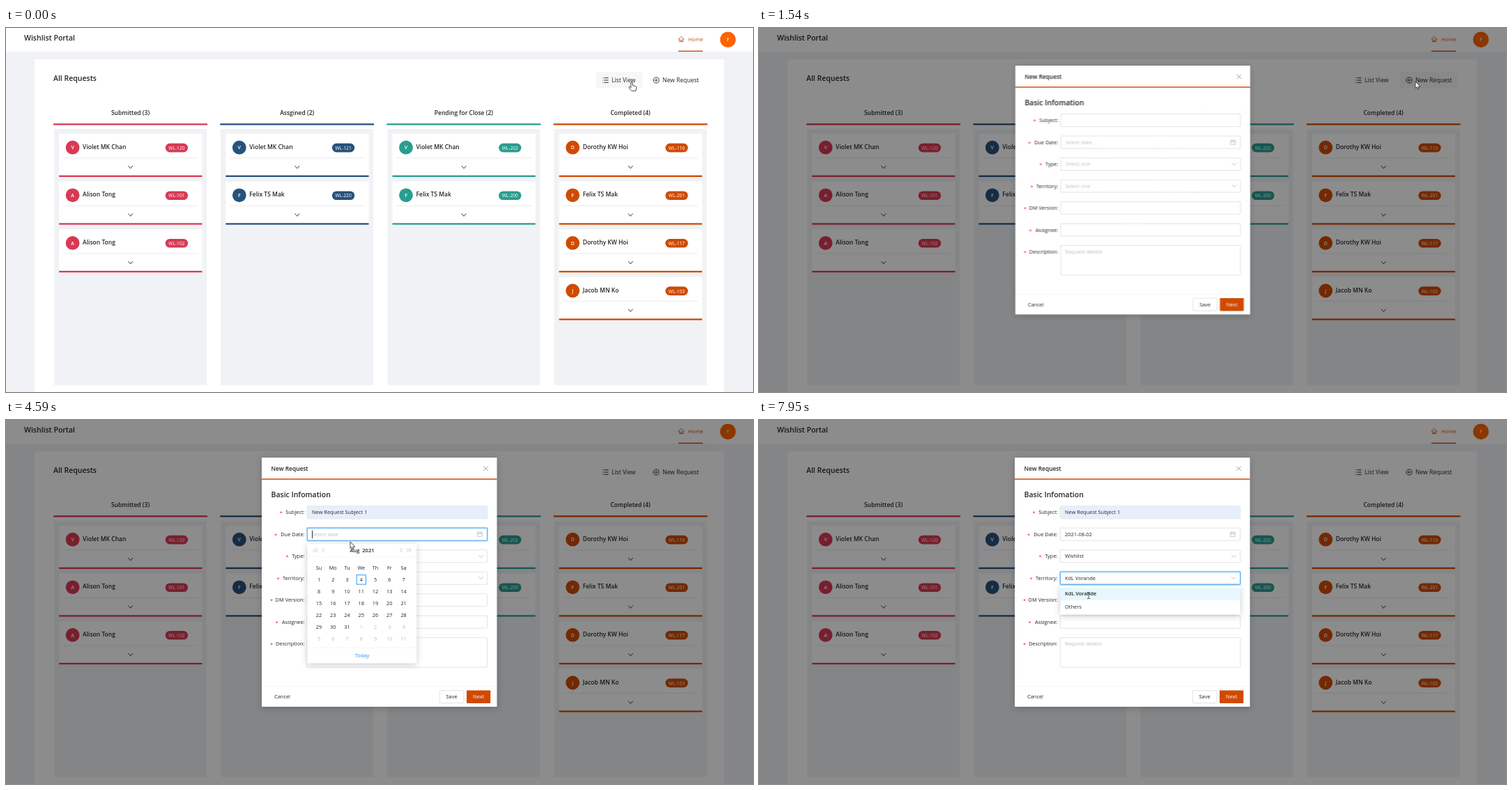
An HTML page for the animation above (8 s loop, 1072 px wide and 523 px high).

```html
<!DOCTYPE html>
<html lang="en">
<head>
<meta charset="utf-8">
<title>Wishlist Portal</title>
<style>
  html, body { margin: 0; width: 100%; height: 100%; overflow: hidden; background: #f0f2f5; }
  svg { display: block; width: 100vw; height: 100vh; font-family: "Open Sans", "Noto Sans", sans-serif; }
  text { fill: #262626; white-space: pre; }
  .semi { font-weight: 600; }
  .mid { text-anchor: middle; }
  .end { text-anchor: end; }
  .hint { fill: #bfbfbf; }
  .white { fill: #fff; }
  .accent { fill: #d04a02; }
  .line { fill: none; stroke-linecap: round; stroke-linejoin: round; }
  .shadow { filter: drop-shadow(0 2px 5px rgba(0, 0, 0, .2)); }
</style>
</head>
<body>
<svg id="stage" viewBox="0 0 1072 523" preserveAspectRatio="none"></svg>
<script>
const LOOP = 8000;
const ORANGE = '#d04a02', BLUE = '#1890ff';

// Markup helpers; text is placed by the middle of its capitals
const text = (x, y, s, size = 7.45, cls = '', more = '') =>
  `<text x="${x}" y="${(y + size * .36).toFixed(2)}" font-size="${size}" class="${cls}" ${more}>${s}</text>`;
const rect = (x, y, w, h, fill, more = '') =>
  `<rect x="${x}" y="${y}" width="${w}" height="${h}" fill="${fill}" ${more}/>`;
const disc = (x, y, r, fill) => `<circle cx="${x}" cy="${y}" r="${r}" fill="${fill}"/>`;
const line = (x, y, d, color, width = 1) =>
  `<path class="line" transform="translate(${x} ${y})" d="${d}" stroke="${color}" stroke-width="${width}"/>`;
const chevron = (x, y, color = '#333', w = 1) => line(x, y, 'M-3-1.7 0 1.8 3-1.7', color, w);
const group = (id, body, more = '') => `<g id="${id}" ${more}>${body}</g>`;

// Timeline helpers, all in milliseconds
let css = '';
function track(id, keys, ease = 'linear') {
  const body = keys.map(([ms, style, curve]) =>
    `${ms * 100 / LOOP}%{${style}${curve ? `;animation-timing-function:${curve}` : ''}}`).join('');
  css += `@keyframes ${id}{${body}}#${id}{animation:${id} ${LOOP}ms ${ease} infinite}\n`;
}
function show(id, ...spans) {
  track(id, [[0, 'opacity:0'], ...spans.flatMap(([a, b = LOOP]) =>
    [[a, 'opacity:1'], [b, 'opacity:0']])], 'step-end');
}
function slide(id, top, open, opened, close, closed) {
  const off = 'opacity:0;transform:scaleY(.8)', on = 'opacity:1;transform:none';
  const keys = [[0, off], [open, off, 'cubic-bezier(.23,1,.32,1)'], [opened, on]];
  if (close) keys.push([close, on, 'cubic-bezier(.755,.05,.855,.06)'], [closed, off], [LOOP, off]);
  else keys.push([LOOP, on]);
  track(id, keys);
  css += `#${id}{transform-origin:0 ${top}px}\n`;
}

// Board
const V = 'Violet MK Chan', A = 'Alison Tong', F = 'Felix TS Mak', D = 'Dorothy KW Hoi', J = 'Jacob MN Ko';
const columns = [
  ['Submitted', '#d93954', [[V, 120], [A, 101], [A, 102]]],
  ['Assgined', '#26527c', [[V, 121], [F, 220]]],
  ['Pending for Close', '#2a9d8f', [[V, 202], [F, 200]]],
  ['Completed', ORANGE, [[D, 116], [F, 201], [D, 117], [J, 103]]],
];

const card = (x, y, color, [name, no]) =>
  rect(x + 8, y, 205.3, 62, '#fff') +
  rect(x + 8, y + 59.7, 205.3, 2.3, color) +
  disc(x + 27.5, y + 19.7, 9.9, color) +
  text(x + 27.5, y + 19.9, name[0], 7, 'semi white mid') +
  text(x + 42, y + 18.8, name, 8.5, 'semi') +
  rect(x + 160.6, y + 13.8, 32.4, 12.6, color, 'rx="6.3"') +
  text(x + 176.8, y + 20.3, 'WL-' + no, 6.7, 'white mid') +
  rect(x + 13.8, y + 34.4, 193.5, .8, '#e6e6e6') +
  chevron(x + 110.6, y + 48);

const column = ([title, color, cards], i) => {
  const x = 68.1 + 239.2 * i;
  return text(x + 110.4, 121.8, `${title} (${cards.length})`, 8.5, 'semi mid') +
    rect(x, 137.2, 220.9, 2.3, color) +
    rect(x + .9, 145.2, 219, 368, '#f0f2f5') +
    cards.map((c, k) => card(x, 152 + 68.6 * k, color, c)).join('');
};

const page =
  rect(0, 0, 1072, 523, '#f0f2f5') + rect(0, 0, 1072, 34, '#fff') +
  rect(41, 45, 989.5, 478, '#fff') +
  text(26, 13.8, 'Wishlist Portal', 10.5, 'semi') +
  line(969, 16.2, 'M-4 0 0-3.8 4 0M-2.8-1V3.4H2.8V-1M-.9 3.4V1H.9V3.4', ORANGE, .8) +
  text(979, 16, 'Home', 7.6, 'accent') +
  rect(965, 32.6, 35, 1.4, ORANGE) +
  disc(1036, 16.7, 11.2, '#fa6400') + text(1036, 16.9, 'F', 7, 'white mid') +
  text(68, 72.2, 'All Requests', 10.5, 'semi') +
  group('hoverList', rect(846.5, 63, 66.5, 23, '#f7f7f7')) +
  group('hoverNew', rect(920, 63, 82.5, 23, '#f7f7f7')) +
  line(856, 75, 'M.3-3.3H.4M.3 0H.4M.3 3.3H.4M2.6-3.3H8.2M2.6 0H8.2M2.6 3.3H8.2', '#333', 1) +
  text(869, 75.2, 'List View', 8.55) +
  line(933, 75, 'M-4.1 0A4.1 4.1 0 1 1 4.1 0A4.1 4.1 0 1 1-4.1 0M-2 0H2M0-2V2', '#333', .9) +
  text(942, 75.2, 'New Request', 8.55) +
  columns.map(column).join('');

// Form
const LEFT = 432.3, WIDE = 258.3, TX = 439;
const rowY = i => 132.7 + 31.5 * i;
const label = (s, i) => {
  const w = [34, 41.5, 25, 38, 47.5, 40, 47.5][i];
  return text(428.6, rowY(i), s + ':', 7.45, 'end') +
    text(428.6 - w, rowY(i) + 1, '*', 7.45, 'mid', 'style="fill:#f5222d"');
};
const box = (i, h = 18) => rect(LEFT, rowY(i) - 9, WIDE, h, '#fff', 'stroke="#d9d9d9" stroke-width=".7" rx=".8"');
const focus = (id, i) => group(id,
  rect(LEFT - 1, rowY(i) - 10, WIDE + 2, 20, 'none', `stroke="${BLUE}" stroke-opacity=".2" stroke-width="1.4" rx="1.5"`) +
  rect(LEFT, rowY(i) - 9, WIDE, 18, 'none', 'stroke="#40a9ff" rx=".8"'));
const value = (id, i, s, cls = '') => group(id, text(TX, rowY(i), s, 7.45, cls));
const caret = (id, x, i) => group(id, rect(x, rowY(i) - 5.6, .9, 11.5, '#222'));

const fields =
  ['Subject', 'Due Date', 'Type', 'Territory', 'DM Version', 'Assignee', 'Description'].map(label).join('') +
  [0, 1, 2, 3, 4, 5].map(i => box(i)).join('') + box(6, 42.5) +
  group('filled', rect(LEFT + .4, rowY(0) - 8.6, WIDE - .8, 17.2, '#e6effb')) +
  value('tryOne', 0, '1') + value('subject', 0, 'New Request Subject 1') +
  value('dateHint', 1, 'Select date', 'hint') +
  value('datePreview', 1, '2021-08-02', 'hint') + value('date', 1, '2021-08-02') +
  line(680, rowY(1), 'M-3.2-2.6H3.2V3.1H-3.2ZM-3.2-.6H3.2M-1.5-3.5V-1.9M1.5-3.5V-1.9', '#b5b5b5', .7) +
  value('typeHint', 2, 'Select one', 'hint') + value('type', 2, 'Wishlist') +
  value('areaHint', 3, 'Select one', 'hint') + value('area', 3, 'KdL Vorande') +
  chevron(681.5, rowY(2), '#bbb', .8) + chevron(681.5, rowY(3), '#bbb', .8) +
  text(TX, rowY(6), 'Request details', 7.45, 'hint') +
  focus('focusSubject', 0) + focus('focusDate', 1) + focus('focusType', 2) + focus('focusArea', 3) +
  caret('caretStart', 439, 0) + caret('caretEnd', 518.6, 0) + caret('caretDate', 439, 1);

const suggestions = ['1', 'New Request Subject 1', 'New Request Subject 2', 'New Request Subject 3',
  'New Request Subject 4', 'My new Subject 1 from LumvaDB Quill Cloud'];
const suggestRow = (id, i) => group(id, rect(432.7, 146.6 + 20.2 * i, 174.2, 20.2, '#525355'));
const suggest = group('suggest',
  rect(432.7, 142.8, 174.2, 129.6, '#3a3b3d', 'rx="1.5" class="shadow"') +
  suggestRow('overOne', 0) + suggestRow('overTwo', 1) +
  suggestions.map((s, i) => text(TX, 156.8 + 20.2 * i, s, 7.45, '', 'style="fill:#f1f1f1"')).join(''));

const cellX = i => 449 + 20.27 * (i % 7), cellY = i => 229.4 + 16.9 * Math.floor(i / 7);
const cell = (i, fill, more = '') => rect(cellX(i) - 6.7, cellY(i) - 6.7, 13.4, 13.4, fill, more);
const arrow = (x, dir) => line(x, 187.3, `M${1.3 * dir}-2.6 ${-1.3 * dir} 0 ${1.3 * dir} 2.6`, '#b5b5b5', .8);
const calendar = group('calendar',
  rect(LEFT, 178, 157, 171.5, '#fff', 'class="shadow"') +
  arrow(442.4, 1) + arrow(445.8, 1) + arrow(455, 1) + arrow(567, -1) + arrow(576.4, -1) + arrow(579.8, -1) +
  text(511, 187.3, 'Aug  2021', 7.5, 'semi mid') +
  rect(LEFT, 196.5, 157, .6, '#f0f0f0') +
  ['Su', 'Mo', 'Tu', 'We', 'Th', 'Fr', 'Sa'].map((d, i) => text(cellX(i), 212.2, d, 7.4, 'mid')).join('') +
  group('overDay', cell(1, '#f0f0f0')) +
  cell(3, 'none', `stroke="${BLUE}" stroke-width=".9"`) +
  Array.from({ length: 42 }, (_, i) =>
    text(cellX(i), cellY(i), i % 31 + 1, 7.4, i < 31 ? 'mid' : 'mid hint')).join('') +
  group('pickedDay', cell(1, BLUE) + text(cellX(1), cellY(1), 2, 7.4, 'mid white')) +
  rect(LEFT, 326.8, 157, .6, '#f0f0f0') +
  text(511, 338.2, 'Today', 7.4, 'mid', `style="fill:${BLUE}"`));

const dropdown = (id, i, first, extra = '') => {
  const y = rowY(i) + 11.3;
  return group(id, rect(LEFT, y, WIDE, 41, '#fff', 'class="shadow"') +
    rect(LEFT, y + 2.5, WIDE, 18, '#f5f5f5') +
    text(TX, y + 11.3, first) + extra + text(TX, y + 29.5, 'Others'));
};
const picked = group('pickedArea', rect(LEFT, 241, WIDE, 18, '#e6f7ff') +
  text(TX, rowY(3) + 22.6, 'KdL Vorande', 7.45, 'semi'));

const modal = group('modal',
  rect(367, 54, 337.5, 358, '#fff', 'class="shadow" rx=".8"') +
  text(380.5, 69.6, 'New Request', 8.4, 'semi') +
  line(688.5, 69.8, 'M-3-3 3 3M3-3-3 3', '#888', .8) +
  rect(367, 84.2, 337.5, 1.5, ORANGE) +
  text(380.5, 107.4, 'Basic Infomation', 10.5, 'semi') +
  fields +
  rect(367, 382.4, 337.5, .7, '#f0f0f0') +
  text(385, 397.8, 'Cancel') +
  rect(622.3, 388.7, 34.6, 18, '#fff', 'stroke="#d9d9d9" stroke-width=".7" rx=".8"') +
  text(639.6, 397.8, 'Save', 7.45, 'mid') +
  rect(661, 388.4, 34.3, 18.5, ORANGE, 'rx=".8"') +
  text(678.2, 397.8, 'Next', 7.45, 'mid white') +
  suggest + calendar + dropdown('typeList', 2, 'Wishlist') + dropdown('areaList', 3, 'KdL Vorande', picked));

// Pointer
const shape = (id, d) => group(id, `<path d="${d}" fill="#fff" stroke="#222" stroke-width=".8" stroke-linejoin="round"/>`);
const pointer = group('pointer',
  group('click', disc(0, 1, 7, '#f7e52c'), 'fill-opacity=".8"') +
  shape('arrow', 'M0 0V9.6L2.2 7.6 3.7 11 5.3 10.3 3.8 7.1H6.9Z') +
  shape('hand', 'M-1.2 1Q-1.2-.4 0-.4T1.2 1V4.6L2.8 4.9 5.6 5.8Q6.9 6.3 6.7 8L5.8 12.4H-.2Q-2.6 10-3.9 7.6Q-4.1 6-2.7 6.4L-1.2 7.8Z') +
  group('beam', line(0, 0, 'M-1.8-4.6Q0-4.6 0-3.8Q0-4.6 1.8-4.6M0-3.8V3.8M-1.8 4.6Q0 4.6 0 3.8Q0 4.6 1.8 4.6', '#333', .8)));

document.getElementById('stage').innerHTML =
  page + group('mask', rect(0, 0, 1072, 523, '#000', 'fill-opacity=".45"')) + modal + pointer;

// Opening
track('hoverList', [[0, 'opacity:1'], [860, 'opacity:1'], [1000, 'opacity:0'], [LOOP, 'opacity:0']]);
track('hoverNew', [[0, 'opacity:0'], [980, 'opacity:0'], [1120, 'opacity:1'], [1600, 'opacity:1'],
  [1700, 'opacity:0'], [LOOP, 'opacity:0']]);
track('mask', [[0, 'opacity:0'], [1370, 'opacity:0'], [1530, 'opacity:1'], [LOOP, 'opacity:1']]);
const shut = 'opacity:0;transform:scale(.2)', open = 'opacity:1;transform:none';
track('modal', [[0, shut], [1367, shut, 'cubic-bezier(.08,.82,.17,1)'], [1567, open], [LOOP, open]]);
css += '#modal{transform-origin:943px 76px}\n';

// Subject
show('focusSubject', [2450, 4400]);
show('caretStart', [2450, 2990]);
show('suggest', [2560, 4030]);
show('overOne', [3430, 3530]);
show('tryOne', [3430, 3530]);
show('overTwo', [3530, 4030]);
show('filled', [3430]);
show('subject', [3530]);
show('caretEnd', [3530, 4170]);

// Due date
show('focusDate', [4400, 5920]);
show('caretDate', [4400, 5010]);
slide('calendar', 178, 4420, 4580, 5500, 5700);
show('overDay', [5080, 5480]);
show('pickedDay', [5480]);
show('dateHint', [0, 5080]);
show('datePreview', [5080, 5480]);
show('date', [5480]);

// Type and territory
show('focusType', [6260, 7180]);
slide('typeList', 207, 6290, 6490, 6830, 7000);
show('typeHint', [0, 6830]);
show('type', [6830]);
show('focusArea', [7180]);
slide('areaList', 238.5, 7210, 7400);
show('areaHint', [0, 7900]);
show('area', [7900]);
show('pickedArea', [7900]);

// Pointer route: arrival and departure at each stop
const stops = [
  [0, 790, 898, 78], [1120, 1610, 942, 77], [2310, 3320, 489, 133], [3600, 4100, 488, 177],
  [4310, 4500, 491, 165], [4590, 4660, 494, 175], [5080, 5850, 470, 230], [6150, 6400, 471, 196],
  [6640, 6900, 475, 215], [7130, 7440, 472, 228], [7600, LOOP, 473, 252],
];
track('pointer', stops.flatMap(([from, to, x, y]) => {
  const at = `transform:translate(${x}px,${y}px)`;
  return [[from, at], [to, at, 'ease-in-out']];
}));
show('hand', [0, 1370]);
show('arrow', [1370, 2250], [3400, 4250], [4550, 7560]);
show('beam', [2250, 3400], [4250, 4550], [7560]);
show('click', [1190, 1330], [2380, 2520], [3890, 4030], [4380, 4520], [5430, 5570],
  [6220, 6360], [6690, 6830], [7150, 7290], [7800, 7900]);

document.head.appendChild(document.createElement('style')).textContent = css;
</script>
</body>
</html>
```
